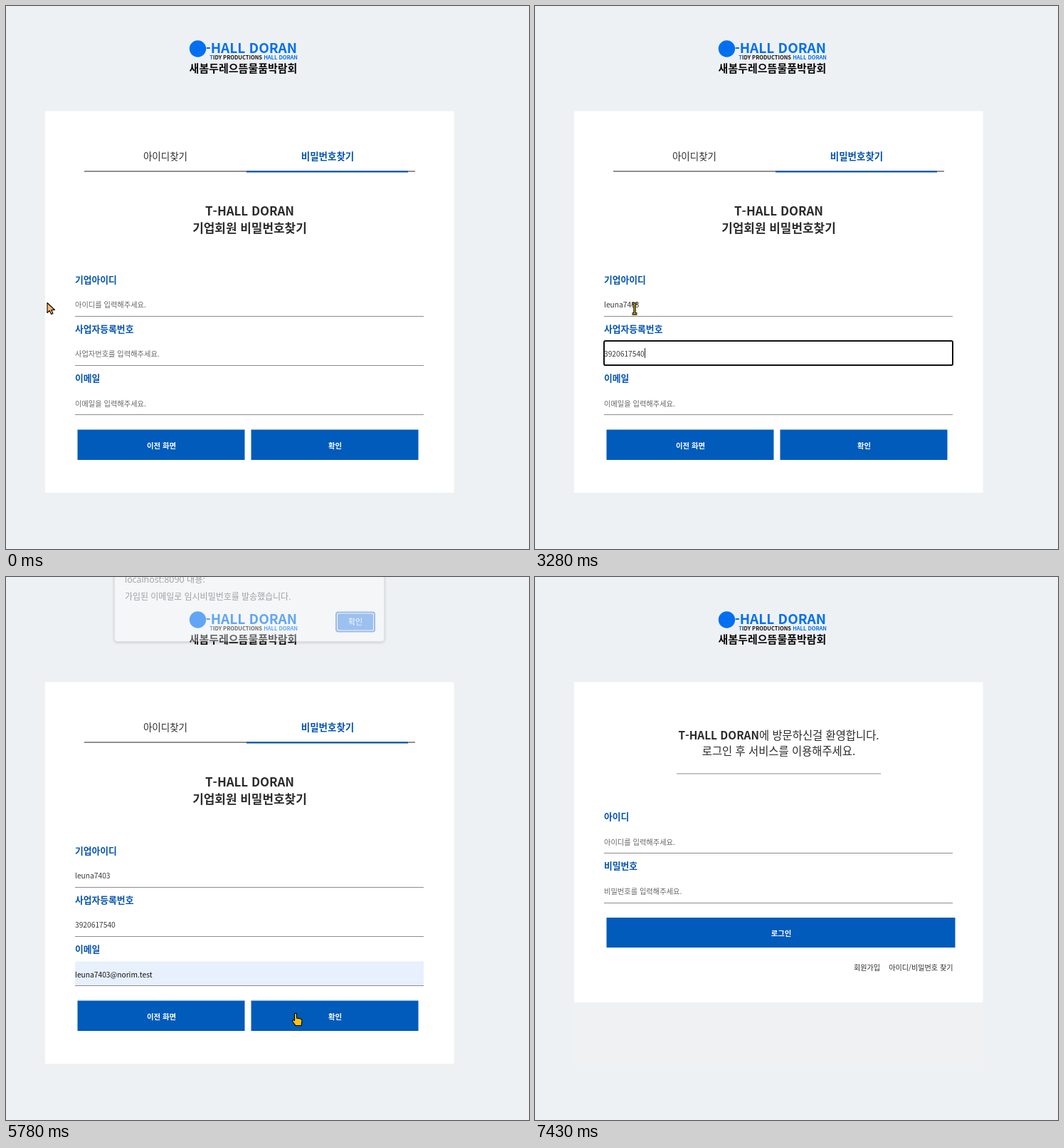
Animation of 735x762 px, one loop 8 s. Source, as an HTML page:

```html
<!DOCTYPE html>
<html lang="ko">
<head>
<meta charset="utf-8">
<title>비밀번호찾기</title>
<style>
  html, body { margin: 0; width: 100%; height: 100%; overflow: hidden; background: #eef1f4; }
  svg { display: block; width: 735px; height: 762px; }
  text { font-family: "Noto Sans CJK KR", "Noto Sans CJK", sans-serif; font-size: 10.24px; fill: #2b2b2b; }
  .mid { text-anchor: middle; }
  .bold { font-weight: 700; }
  .blue { fill: #0554b0; }
  .label { font-size: 12.8px; font-weight: 700; fill: #0554b0; }
  .hint { fill: #666; }
  .value { fill: #383838; }
  .line { fill: #8c8c8c; }
  .button { fill: #005bbb; }
  .onButton { fill: #fff; font-size: 10.4px; font-weight: 700; text-anchor: middle; }
  .tab { font-size: 13.5px; text-anchor: middle; }
  .head { font-size: 16.95px; font-weight: 700; text-anchor: middle; }
  .welcome { font-size: 15.4px; text-anchor: middle; }
  .ring { fill: none; stroke: #101010; stroke-width: 2; }
  .menu rect:first-child { fill: #fff; filter: drop-shadow(0 1px 2px #0004); }
  .menu text { font-family: "Open Sans", sans-serif; font-size: 10.75px; }
  #dialog text { font-family: "Open Sans", "Noto Sans CJK KR", sans-serif; fill: #202124; }
  #dialog .panel { fill: #fff; stroke: #bbb; stroke-width: .6; filter: drop-shadow(0 1px 2px #0007); }
  #cursor path { stroke: #000; stroke-linejoin: round; stroke-width: 1.1; }
</style>
</head>
<body>
<svg viewBox="0 0 735 762">
  <rect width="735" height="762" fill="#eef1f4"/>
  <circle cx="269.5" cy="60" r="11.7" fill="#0070f0"/>
  <text x="409" y="66" class="bold" text-anchor="end" style="font-size:19px;fill:#0070f0">-HALL DORAN</text>
  <text x="410" y="75" class="bold" text-anchor="end" style="font-size:7.5px;fill:#111"><tspan fill="#0070f0">T</tspan>IDY PRODUCTIONS <tspan fill="#0070f0">HALL DORAN</tspan></text>
  <text x="333.5" y="92.5" class="mid bold" style="font-size:15px;fill:#080808">새봄두레으뜸물품박람회</text>

  <g id="finder">
    <rect x="55" y="147.5" width="574.5" height="535.5" fill="#fff"/>
    <text x="224" y="216" class="tab">아이디찾기</text>
    <text x="452" y="216" class="tab bold blue">비밀번호찾기</text>
    <rect x="110" y="231.5" width="465" height="1" fill="#222"/>
    <rect x="338" y="231.5" width="227" height="2" fill="#0554b0"/>
    <text x="342.5" y="293.5" class="head">T-HALL DORAN</text>
    <text x="342.5" y="318" class="head">기업회원 비밀번호찾기</text>
    <rect id="filled" x="97" y="539.5" width="490" height="34" fill="#e8f0fe"/>
    <g id="finderFields"></g>
    <rect x="100.5" y="594.5" width="235" height="42.5" class="button"/>
    <rect x="344.5" y="594.5" width="235" height="42.5" class="button"/>
    <text x="218.5" y="621" class="onButton">이전 화면</text>
    <text x="462.5" y="621" class="onButton">확인</text>
    <rect id="ring" x="97" width="490" height="34" rx="2" class="ring"/>
    <rect id="caret" width="1" height="14" fill="#222"/>
    <g id="numberMenu" class="menu"></g>
    <g id="mailMenu" class="menu"></g>
  </g>

  <g id="login">
    <rect x="55" y="597" width="574.5" height="88" fill="#f0f1f3"/>
    <rect x="55" y="147.5" width="574.5" height="449.5" fill="#fff"/>
    <text x="342.5" y="228" class="welcome"><tspan class="bold">T-HALL DORAN</tspan>에 방문하신걸 환영합니다.</text>
    <text x="342.5" y="250" class="welcome">로그인 후 서비스를 이용해주세요.</text>
    <rect x="199" y="275.5" width="287" height="1" class="line"/>
    <g id="loginFields"></g>
    <rect x="100.5" y="478" width="490" height="42" class="button"/>
    <text x="346" y="504" class="onButton">로그인</text>
    <text x="448" y="552" style="font-size:10.1px">회원가입</text>
    <text x="587.5" y="552" text-anchor="end" style="font-size:10.1px">아이디/비밀번호 찾기</text>
  </g>

  <g id="dialog">
    <rect x="152.5" y="-40" width="379" height="142" rx="4" class="panel"/>
    <text x="167" y="19" style="font-size:12.4px">localhost:8090 내용:</text>
    <text x="167" y="43" style="font-size:12px">가입된 이메일로 임시비밀번호를 발송했습니다.</text>
    <rect x="464" y="61" width="54" height="27" rx="3" fill="#fff" stroke="#1a66d0" stroke-width="2"/>
    <rect x="466" y="63" width="50" height="23" rx="2" fill="#1a73e8"/>
    <text x="491" y="78" class="mid" style="font-size:11px;fill:#fff">확인</text>
  </g>

  <g id="cursor">
    <path id="arrow" d="M0 0V14L3.3 11L5.6 16L8 15L5.8 10H10.5Z"/>
    <g id="beam">
      <path d="M-3.5-7H3.5M0-7V7M-3.5 7H3.5" style="stroke-width:3.4"/>
      <path d="M-3.5-7H3.5M0-7V7M-3.5 7H3.5" style="stroke:#ffc20e;stroke-width:1.2"/>
    </g>
    <path id="hand" fill="#ffc20e" d="M-1.5 1.2Q0-.8 1.5 1.2V7L7 8Q9 8.5 9 10.5L8 17.5H0L-4.5 11.5Q-4.5 8.5-1.5 10.5Z"/>
  </g>
</svg>
<script>
const LOOP = 8000, STEP = 70, PITCH = 69.2;
const USER = "leuna7403", NUMBER = "3920617540", MAIL = USER + "@norim.test";
const $ = id => document.getElementById(id);
const show = (id, on) => $(id).style.display = on ? "" : "none";

// A labelled input: y is the label's baseline
const field = (label, hint, y) => `
  <text x="97" y="${y}" class="label">${label}</text>
  <text x="97" y="${y + 34.4}" class="hint">${hint} 입력해주세요.</text>
  <text x="97" y="${y + 34.4}" class="value"></text>
  <rect x="97" y="${Math.round(y + 46.2)}" width="490" height="1" class="line"/>`;
const fields = (rows, y) => rows.map(([label, hint], i) => field(label, hint, y + i * PITCH)).join("");
const menu = (rows, y) => `
  <rect x="97" y="${y}" width="162" height="${12 + 32 * rows.length}" rx="3"/>
  <rect class="hover" x="97" y="${y + 6}" width="162" height="32" fill="#ececec" visibility="hidden"/>` +
  rows.map((row, i) => `<text x="107" y="${y + 26 + 32 * i}">${row}</text>`).join("");

$("finderFields").innerHTML = fields([["기업아이디", "아이디를"], ["사업자등록번호", "사업자번호를"], ["이메일", "이메일을"]], 388.7);
$("loginFields").innerHTML = fields([["아이디", "아이디를"], ["비밀번호", "비밀번호를"]], 341.2);
$("numberMenu").innerHTML = menu([NUMBER, "3920617", "5170382946", "8064"], 505.5);
$("mailMenu").innerHTML = menu([MAIL], 574);
const hints = document.querySelectorAll("#finder .hint");
const values = document.querySelectorAll("#finder .value");
const hover = document.querySelector("#mailMenu .hover");
values[2].style.fill = "#111";

// Cursor moves: start, number of steps, end point
const moves = [
  [130, 4, 140, 425], [3480, 8, 164.5, 562], [4900, 3, 170, 597],
  [5180, 7, 407, 612], [5930, 9, 482, 80], [7290, 2, 102, 141]
];

function cursorAt(t) {
  let x = 58, y = 416.5;
  for (const [start, steps, toX, toY] of moves) {
    if (t < start) break;
    const p = Math.min(1, (Math.floor((t - start) / STEP) + 1) / steps);
    const e = p * p * (3 - 2 * p);
    x += (toX - x) * e;
    y += (toY - y) * e;
  }
  return [x, y];
}

function typed(t) {
  if (t < 1730) return 0;
  if (t < 1930) return 1;
  if (t < 2130) return 3;
  return Math.min(USER.length, 4 + Math.floor((t - 2130) / 94));
}

function dialogAlpha(t) {
  if (t < 5780 || t >= 6830) return 0;
  if (t < 5860) return .38;
  if (t < 5930) return .8;
  return t < 6760 ? 1 : .5;
}

function focusAt(t) {
  if (t < 930 || t >= 5660) return -1;
  return t < 2800 ? 0 : t < 4100 ? 1 : 2;
}

function draw(t) {
  const onLogin = t >= 7000;
  show("finder", !onLogin);
  show("login", onLogin);

  const texts = [USER.slice(0, typed(t)), t >= 3210 ? NUMBER : "", t >= 4970 ? MAIL : ""];
  texts.forEach((text, i) => {
    values[i].textContent = text;
    hints[i].style.display = text ? "none" : "";
  });
  show("filled", texts[2]);

  const focus = focusAt(t);
  show("ring", focus >= 0);
  show("caret", focus >= 0 && focus < 2 && texts[focus]);
  if (focus >= 0) {
    $("ring").setAttribute("y", 401 + Math.round(focus * PITCH));
    $("caret").setAttribute("y", 411 + Math.round(focus * PITCH));
    $("caret").setAttribute("x", Math.round(97 + values[focus].getComputedTextLength()));
  }
  show("numberMenu", t >= 2930 && t < 3280);
  show("mailMenu", t >= 4170 && t < 5110);
  hover.setAttribute("visibility", t >= 4970 ? "inherit" : "hidden");

  const alpha = dialogAlpha(t);
  show("dialog", alpha);
  $("dialog").setAttribute("opacity", alpha);
  $("dialog").setAttribute("transform", `translate(0 ${-18.5 * (1 - alpha)})`);

  const beam = t >= 200 && t < 4970, hand = t >= 5110 && t < 5930;
  show("beam", beam);
  show("hand", hand);
  show("arrow", !beam && !hand);
  $("arrow").setAttribute("fill", t < 200 ? "#ffb870" : "#ffc20e");
  show("cursor", t < 7430);
  $("cursor").setAttribute("transform", `translate(${cursorAt(t)})`);
}

function tick() {
  draw(performance.now() % LOOP);
  requestAnimationFrame(tick);
}
tick();
</script>
</body>
</html>
```
